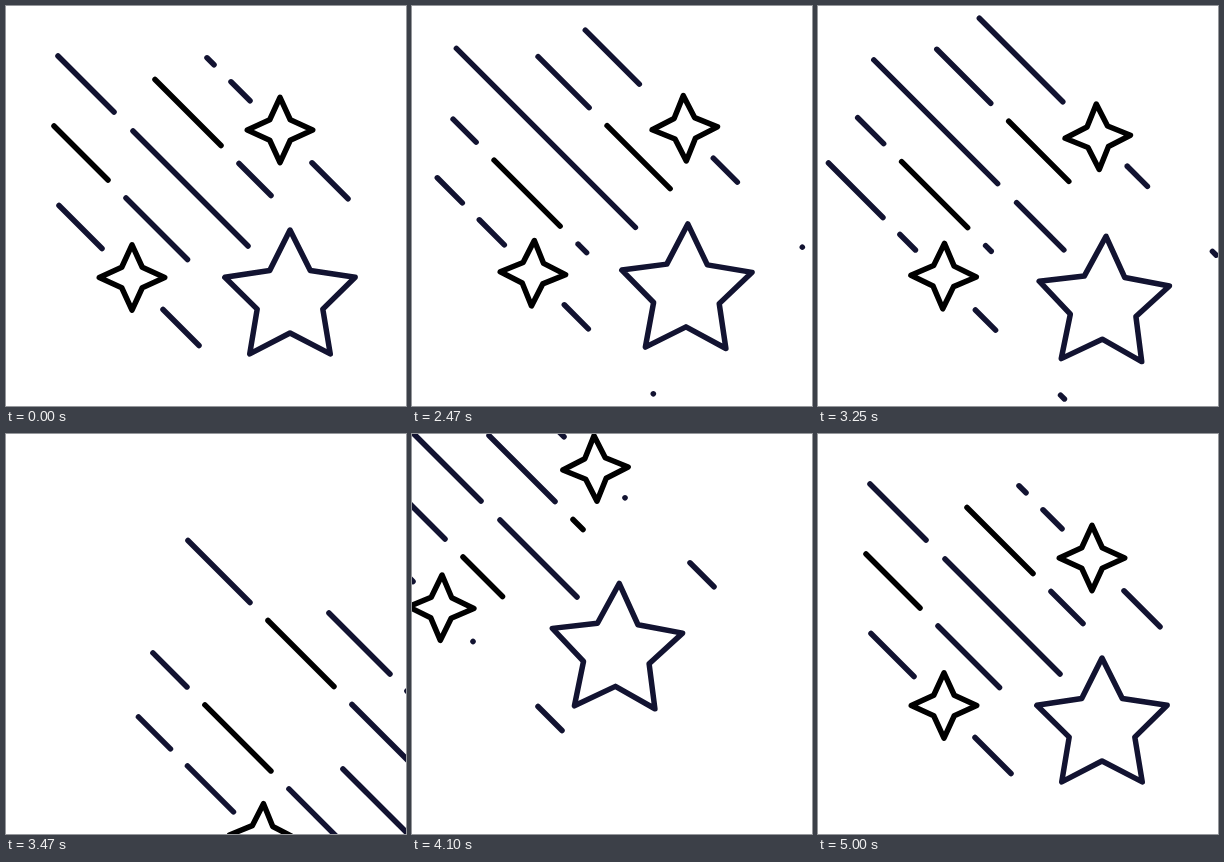
An HTML page with a canvas that plays this animation: 400 by 400 pixels, repeating every 5.02 s.

```html
<!DOCTYPE html>
<html lang="en">
<head>
<meta charset="utf-8">
<title>Shooting stars</title>
<style>
  html, body { margin: 0; width: 100%; height: 100%; overflow: hidden; background: #fff; }
  canvas { display: block; width: 100vmin; height: 100vmin; }
</style>
</head>
<body>
<canvas id="stage" width="400" height="400"></canvas>
<script>
const ctx = document.getElementById('stage').getContext('2d');
const LOOP = 5020, START = 2010, LAUNCH = 3100, RETURN = 3630;
const NAVY = '#121331', BLACK = '#000';
const KEY_TIMES = [START, 2470, 3000, 3470, 4100, 5000];

const clamp = u => Math.min(1, Math.max(0, u));

// Smoothly interpolate values placed at KEY_TIMES
function keyed(values, t) {
  let i = 0;
  while (i < values.length - 2 && t > KEY_TIMES[i + 1]) i++;
  const u = clamp((t - KEY_TIMES[i]) / (KEY_TIMES[i + 1] - KEY_TIMES[i]));
  return values[i] + (values[i + 1] - values[i]) * u * u * (3 - 2 * u);
}

// Diagonal offset: draw back, shoot out, come in again from the top left
function travel(t, back, reach, power, hold) {
  if (t < LAUNCH) return -back * clamp((t - START) / (LAUNCH - START)) ** 0.9;
  if (t < RETURN) return -back + reach * ((t - LAUNCH) / 520) ** power;
  return -350 * (1 - clamp((t - RETURN) / 460)) ** 3
       + hold * (1 - clamp((t - 4160) / 830)) ** 2.5;
}

// Repeating dashes [start, length, colour] on the line y = x + c, cut to from..to
function track(c, from, to, shift, phase, period, dashes) {
  for (let k = -4; k <= 4; k++) {
    for (const [start, length, colour] of dashes) {
      const x = phase + k * period + start;
      const a = Math.max(from, x), b = Math.min(to, x + length);
      if (b < a - 0.8) continue;
      const x1 = a + shift, x2 = Math.max(a, b) + shift + 0.01;
      ctx.strokeStyle = colour;
      ctx.beginPath();
      ctx.moveTo(x1, x1 + c);
      ctx.lineTo(x2, x2 + c);
      ctx.stroke();
    }
  }
}

function star(x, y, points, outer, inner, colour, [dx, dy, degrees]) {
  ctx.strokeStyle = colour;
  ctx.beginPath();
  for (let i = 0; i < points * 2; i++) {
    const r = i % 2 ? inner : outer;
    const a = i * Math.PI / points + degrees * Math.PI / 180;
    ctx.lineTo(x + dx + r * Math.sin(a), y + dy - r * Math.cos(a));
  }
  ctx.closePath();
  ctx.stroke();
}

// Hand-drawn wobble: each pose is held for a quarter of a second
const POSE_ORDER = '121232123120';
const REST = [0, 0, 0];
const BIG_POSES = [REST, [-1.5, 2.5, -2.1], [-1.8, 1.5, 1], [-2.3, 2.4, 2.1]];
const RIGHT_POSES = [REST, [2, 2.3, 2], [2.5, 2, -2.6], [1.5, 2.5, -2.6]];
const LEFT_POSES = [REST, [-1.2, -2.5, -2], [-1.4, -0.6, 2.5], [-1.8, -2.8, 1.5]];

const MIXED = [[0, 66, BLACK], [84, 66, NAVY]];
const TRAIL = [[17, 113, NAVY]];
const FRONT = [[0, 36, NAVY]];

function draw(t) {
  ctx.fillStyle = '#fff';
  ctx.fillRect(0, 0, 400, 400);
  ctx.lineWidth = 5.5;
  ctx.lineCap = ctx.lineJoin = 'round';

  const big = travel(t, 16.5, 830, 3, -77);
  const right = travel(t, 8, 501, 3, -92);
  const left = travel(t, 8, 384, 3, -95);
  const upper = travel(t, 15, 330, 4.86, -94);
  const lower = travel(t, 15, 330, 3.15, -91);

  // Streaks around the big star
  track(-2, 52, 242, big, keyed([306, 231, 189, 165, 146, 108], t), 198, [[19, 179, NAVY]]);
  const mixed = keyed([168, 53, 46, 64, 106, 0], t);
  track(-75.5, 133, 265 + 3 * Math.max(0, upper), upper, 149 + mixed, 168, MIXED);
  track(72, 48, 181.5 + 3 * Math.max(0, lower), lower, 36 + mixed, 168, MIXED);

  // Streaks behind and ahead of the small stars
  const gap = keyed([468, 361, 278, 210, 120, 78], t);
  const extra = keyed([0, -24, -34, -52, -25, 0], t);
  const front = keyed([0, -13, -13, -20, -37, -101], t);
  const rightC = -149.2 + 0.03 * Math.max(0, right);
  const leftC = 146.5 + 0.03 * Math.max(0, left);
  track(rightC, 201 + extra, 244, right, gap, 130, TRAIL);
  track(leftC, 53 + extra, 96, left, gap - 177, 130, TRAIL);
  track(rightC, 305, 394, right, 306 + front, 101, FRONT);
  track(leftC, 156, 245, left, 157 + front, 101, FRONT);

  const slot = Math.floor((t - START) / 250);
  const pose = +(POSE_ORDER[slot] || 0);
  star(284 + big, 292.5 + big, 5, 68.5, 34.5, NAVY, BIG_POSES[pose]);
  star(274 + right, 124 + right, 4, 32.7, 14.5, BLACK, RIGHT_POSES[pose]);
  star(126 + left, 271.5 + left, 4, 32.7, 14.5, BLACK, LEFT_POSES[pose]);
}

const begin = performance.now();
function tick() {
  draw((performance.now() - begin) % LOOP);
  requestAnimationFrame(tick);
}
tick();
</script>
</body>
</html>
```
